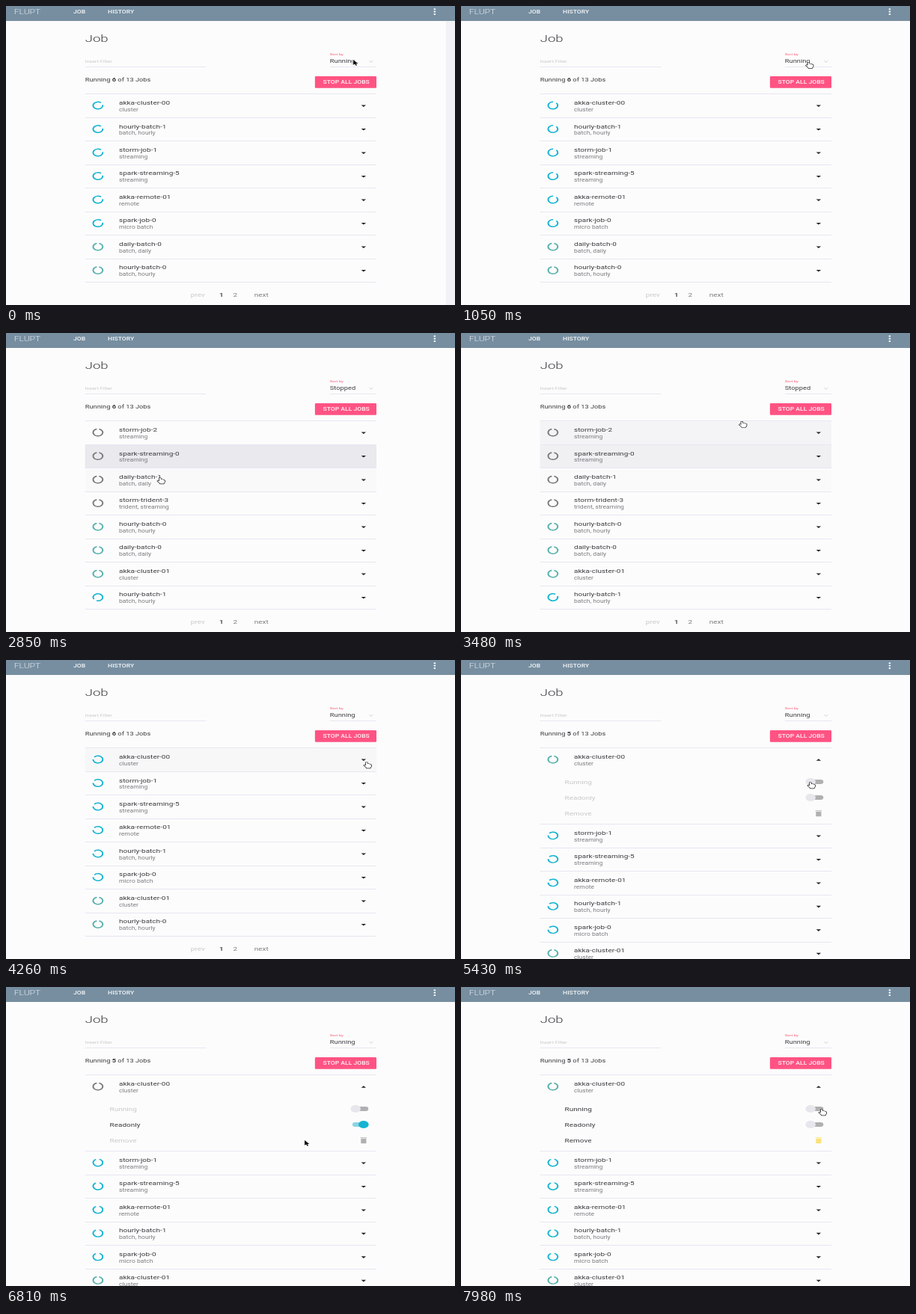
Write an HTML page with a canvas that moves like this. It is 600 px wide and 400 px high and loops after 8000 ms.

```html
<!DOCTYPE html>
<html lang="en">
<head>
<meta charset="utf-8">
<title>Job list</title>
<style>
  html, body { margin: 0; width: 100%; height: 100%; overflow: hidden; background: #fcfcfc; }
  canvas { display: block; }
</style>
</head>
<body>
<canvas id="stage" width="600" height="400"></canvas>
<script>
const ctx = document.getElementById('stage').getContext('2d');
const LOOP = 8000;
// The page is laid out at 840 x 762 and shown on a flatter stage.
const SX = 600 / 840, SY = 400 / 762;
const LEFT = 148, RIGHT = 693, LIST_TOP = 224.5, ROW = 60, PANEL = 134;
const INK = '#3c3c40', SOFT = '#7c7c80', PALE = '#c9c9cc', LINE = '#e6e6f3';
const CYAN = '#14b4d2', TEAL = '#56b0ac', GREY = '#7a7a7c';

const TAGS = {
  'akka-cluster': 'cluster', 'akka-remote': 'remote', 'hourly-batch': 'batch, hourly',
  'daily-batch': 'batch, daily', 'storm-job': 'streaming', 'storm-trident': 'trident, streaming',
  'spark-streaming': 'streaming', 'spark-job': 'micro batch'
};
const WAITING = ['daily-batch-0', 'hourly-batch-0', 'akka-cluster-01'];
const STOPPED = ['spark-streaming-0', 'daily-batch-1', 'storm-trident-3', 'storm-job-2'];
const VIEWS = [
  { from: 0, sort: 'Running', jobs: ['akka-cluster-00', 'hourly-batch-1', 'storm-job-1', 'spark-streaming-5',
    'akka-remote-01', 'spark-job-0', 'daily-batch-0', 'hourly-batch-0'] },
  { from: 1400, sort: 'Waiting', jobs: ['daily-batch-0', 'akka-cluster-01', 'hourly-batch-0', 'spark-streaming-0',
    'daily-batch-1', 'storm-trident-3', 'storm-job-2', 'hourly-batch-1'] },
  { from: 2340, sort: 'Stopped', jobs: ['storm-job-2', 'spark-streaming-0', 'daily-batch-1', 'storm-trident-3',
    'hourly-batch-0', 'daily-batch-0', 'akka-cluster-01', 'hourly-batch-1'] },
  { from: 3850, sort: 'Running', jobs: ['akka-cluster-00', 'storm-job-1', 'spark-streaming-5', 'akka-remote-01',
    'hourly-batch-1', 'spark-job-0', 'akka-cluster-01', 'hourly-batch-0'] }
];
const EXPAND = 4500, STOP = 5250, HALTED = 5750, LOCK = 6150, UNLOCK = 7400, RESTART = 7930;

// Pointer path: time, then stage x and y
const PATH = [
  [0, 464, 72], [700, 462, 75], [1400, 467, 76], [1920, 469, 75], [2340, 469, 75],
  [2600, 230, 160], [2810, 205, 178], [2850, 206, 194], [3150, 207, 198], [3700, 466, 76],
  [4150, 466, 76], [4260, 482, 137], [4750, 480, 137], [5150, 467, 164], [5700, 467, 164],
  [6050, 470, 184], [6250, 470, 184], [6750, 399, 205], [6900, 399, 205], [7300, 471, 184],
  [7550, 471, 184], [7900, 482, 164], [8000, 482, 164]
];

const clamp = v => Math.max(0, Math.min(1, v));
const ease = v => { v = clamp(v); return v * v * (3 - 2 * v); };
const between = (t, a, b) => t >= a && t < b;

function pointer(t) {
  t = Math.max(0, t);
  const i = Math.max(1, PATH.findIndex(p => p[0] > t));
  const [t0, x0, y0] = PATH[i - 1], [t1, x1, y1] = PATH[i];
  const k = ease((t - t0) / (t1 - t0));
  return { x: x0 + (x1 - x0) * k, y: y0 + (y1 - y0) * k };
}

function text(str, x, y, size, color = INK, weight = 400) {
  ctx.font = `${weight} ${size}px Roboto, sans-serif`;
  ctx.fillStyle = color;
  ctx.fillText(str, x, y + size * 0.355);
  return x + ctx.measureText(str).width;
}

function box(x, y, w, h, color, r = 0) {
  ctx.fillStyle = color;
  ctx.beginPath();
  ctx.roundRect(x, y, w, h, r);
  ctx.fill();
}

function disc(x, y, r, color) {
  ctx.fillStyle = color;
  ctx.beginPath();
  ctx.arc(x, y, r, 0, 7);
  ctx.fill();
}

function polygon(points, fill, stroke, width = 1) {
  ctx.beginPath();
  points.forEach(([x, y]) => ctx.lineTo(x, y));
  ctx.closePath();
  if (stroke) { ctx.strokeStyle = stroke; ctx.lineWidth = width; ctx.stroke(); }
  ctx.fillStyle = fill;
  ctx.fill();
}

// A hairline snapped to one stage pixel
function rule(x0, x1, y) {
  box(x0, Math.floor(y * SY) / SY, x1 - x0, 1 / SY, LINE);
}

function statusOf(job, t) {
  if (WAITING.includes(job)) return TEAL;
  if (STOPPED.includes(job)) return GREY;
  if (job !== 'akka-cluster-00' || t < STOP) return CYAN;
  return between(t, HALTED, RESTART) ? GREY : TEAL;
}

function ring(x, y, color, t) {
  const spinning = color === CYAN;
  const gap = spinning ? 0.36 : 0.24;
  const mid = spinning ? -0.52 + t / 1170 * 2 * Math.PI : -Math.PI / 2;
  ctx.strokeStyle = color;
  ctx.lineWidth = 2.8;
  ctx.beginPath();
  ctx.arc(x, y, 9, mid + gap, mid - gap + 2 * Math.PI);
  ctx.stroke();
}

function caret(x, y, flip) {
  const s = flip ? -1 : 1;
  polygon([[x - 4.5, y - 2 * s], [x + 4.5, y - 2 * s], [x, y + 2.8 * s]], '#222226');
}

function toggle(y, on) {
  box(648, y - 5.5, 30, 11, on > 0.5 ? '#8cd4e2' : '#b0b0b2', 5.5);
  disc(654 + 15 * on, y, 9.5, on > 0.5 ? CYAN : '#e6e6ec');
}

function panel(y, t) {
  const busy = between(t, STOP, HALTED), locked = between(t, LOCK, UNLOCK);
  const active = t >= STOP && !busy && !locked;
  const label = (str, dy, enabled) => text(str, 194, y + dy, 14, enabled ? INK : PALE);
  label('Running', 86, !busy && !locked);
  label('Readonly', 126, !busy);
  label('Remove', 166, active);
  toggle(y + 86, 1 - ease((t - STOP) / 150));
  toggle(y + 126, ease((t - LOCK) / 150) - ease((t - UNLOCK) / 150));
  const bin = active ? '#fbe17c' : '#b0b0b2';
  box(663, y + 159, 12, 2, bin);
  box(664, y + 162, 10, 12, bin, 1);
}

function hoverOf(top, t) {
  let hits = 0;
  for (let k = 0; k < 12; k++) {
    const p = pointer(t - k * 20), x = p.x / SX, y = p.y / SY;
    if (x > LEFT && x < RIGHT && y > top && y < top + ROW) hits++;
  }
  return hits / 12;
}

function header() {
  box(0, 0, 840, 38, '#768ea0');
  text('FLUPT', 15, 15.5, 17, '#e4eaf0', 300);
  text('JOB', 126, 15.5, 12, '#f4f6f8', 500);
  text('HISTORY', 190.5, 15.5, 12, '#f4f6f8', 500);
  for (const y of [8, 14.5, 21]) disc(802, y, 2, '#fff');
}

function controls(view, t) {
  text('Job', LEFT, 83, 26, INK, 300);
  text('Insert Filter', LEFT, 142, 10, PALE);
  rule(LEFT, 374, 154.5);
  text('Sort by', 606, 122.5, 8, '#ff5270');
  text(view.sort, 606, 141, 13);
  rule(606, RIGHT, 154.5);
  ctx.strokeStyle = PALE;
  ctx.lineWidth = 1.4;
  ctx.beginPath();
  ctx.moveTo(679.5, 139.5);
  ctx.lineTo(683, 143.5);
  ctx.lineTo(686.5, 139.5);
  ctx.stroke();

  let x = text('Running ', LEFT, 187.5, 13);
  x = text(t < STOP ? '6' : '5', x, 187.5, 13, INK, 700);
  text(' of 13 Jobs', x, 187.5, 13);
  box(578, 179, 115, 30, '#ff5383', 2);
  text('STOP ALL JOBS', 593, 193.5, 12, '#fff4f7', 500);
}

function list(view, t) {
  const open = PANEL * ease((t - EXPAND) / 350);
  rule(LEFT, RIGHT, LIST_TOP);
  view.jobs.forEach((job, i) => {
    const y = LIST_TOP + i * ROW + (i ? open : 0);
    const hover = hoverOf(y, t);
    if (hover) box(LEFT, y + 1, RIGHT - LEFT, ROW - 2, `rgba(230, 230, 236, ${hover})`);
    ring(172, y + 29, statusOf(job, t), t);
    text(job, 211.4, y + 22, 14);
    text(TAGS[job.replace(/-\d+$/, '')], 211.4, y + 39.5, 12, SOFT);
    caret(669, y + 30, i === 0 && t >= EXPAND);
    if (i === 0 && open) {
      ctx.save();
      ctx.beginPath();
      ctx.rect(LEFT, y + ROW, RIGHT - LEFT, open);
      ctx.clip();
      panel(y, t);
      ctx.restore();
    }
    rule(LEFT, RIGHT, y + ROW + (i ? 0 : open));
  });
  const y = 735.5 + open;
  text('prev', 345.5, y, 14, PALE);
  text('1', 399, y, 14, INK, 500);
  text('2', 425, y, 14, SOFT);
  text('next', 464.5, y, 14, SOFT);
}

function drawPointer(t) {
  const p = pointer(t);
  ctx.save();
  ctx.translate(p.x / SX, p.y / SY);
  if (t < 800 || between(t, 6450, 7150)) {
    polygon([[0, 0], [0, 13], [3, 10.4], [5, 15], [7.2, 14], [5.2, 9.6], [9, 9.4]], '#111', '#fff', 2);
  } else {
    polygon([[-1.5, 0], [1, 0], [1.4, 4], [4, 4], [6.5, 5], [8.5, 6.5], [8.5, 10], [6.5, 14.5],
      [0, 14.5], [-2, 11], [-5, 8], [-4, 6.5], [-1.5, 8]], '#fff', '#222', 2.2);
  }
  ctx.restore();
}

function draw(t) {
  const view = VIEWS.filter(v => v.from <= t).pop();
  ctx.setTransform(SX, 0, 0, SY, 0, 0);
  box(0, 0, 840, 762, '#fcfcfc');
  const edge = 1 - clamp((t - 100) / 300);
  if (edge) box(823, 38, 17, 724, `rgba(242, 242, 246, ${edge})`);
  header();
  controls(view, t);
  list(view, t);
  drawPointer(t);
}

const start = performance.now();
function frame() {
  draw((performance.now() - start) % LOOP);
  requestAnimationFrame(frame);
}
frame();
</script>
</body>
</html>
```
